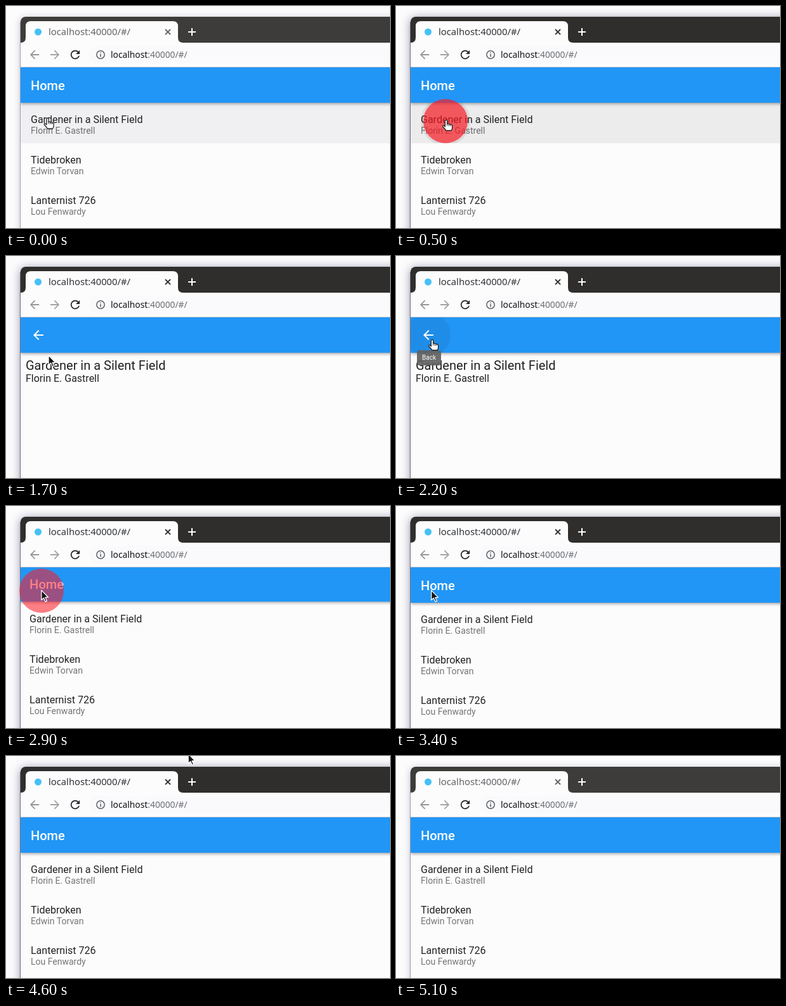
An HTML page with a canvas for the animation above (5.2 s loop, 605 by 351 pixels).

```html
<!DOCTYPE html>
<html lang="en">
<head>
<meta charset="utf-8">
<title>Book list navigation</title>
<style>
html, body { margin: 0; width: 100%; height: 100%; overflow: hidden; background: #fcfcfd; }
canvas { display: block; }
</style>
</head>
<body>
<canvas id="stage" width="605" height="351"></canvas>
<script>
const ctx = document.getElementById('stage').getContext('2d');
const W = 605, H = 351, LOOP = 5200, STEP = 100;
const PAPER = '#fcfcfd', BLUE = '#2196f6';
const INK = 'rgba(0,0,0,.87)', MUTED = 'rgba(0,0,0,.54)';
const UI = '"Noto Sans", "Open Sans", sans-serif', APP = 'Roboto, sans-serif';
const VIEW = { x: 23, y: 97, w: 794, h: 766, cx: 420, cy: 480 };

const BOOKS = [
  ['Gardener in a Silent Field', 'Florin E. Gastrell'],
  ['Tidebroken', 'Edwin Torvan'],
  ['Lanternist 726', 'Lou Fenwardy']
];

const PUSH = 550, POP = 2740, ROUTE_MS = 300;
const CLICKS = [{ at: 400, x: 78, y: 182 }, { at: 2650, x: 56, y: 134 }];
const MOUSE = [[0, 64.5, 177], [350, 78, 180], [1400, 78, 180], [2000, 56, 132],
               [4300, 55.5, 132.5], [4700, 330, -30], [LOOP, 330, -30]];

const ICON = {
  arrow: new Path2D('M20 11H7.83l5.59-5.59L12 4l-8 8 8 8 1.41-1.41L7.83 13H20z'),
  reload: new Path2D('M17.65 6.35C16.2 4.9 14.21 4 12 4c-4.42 0-7.99 3.58-7.99 8s3.57 8 7.99 8c3.73 0 6.84-2.55 7.73-6h-2.08c-.82 2.33-3.04 4-5.65 4-3.31 0-6-2.69-6-6s2.69-6 6-6c1.66 0 3.14.69 4.22 1.78L13 11h7V4z'),
  pointer: new Path2D('M0 1V16.5L3.6 13.2 6.2 19 8.6 18 6.2 12.3H10.8z'),
  hand: new Path2D('M-.6 1.2Q1 -1 2.6 1.2V6.5Q4.2 5 5.4 7Q7 5.8 8 7.6Q10.6 6.8 10.6 9.5V12.5Q10.6 15 9 17H1Q-1 14 -4 11Q-5 8.5 -2.6 9L-.6 10.8Z')
};

const clamp = v => Math.max(0, Math.min(1, v));
const lerp = (a, b, p) => a + (b - a) * p;
const ramp = (v, from, to) => clamp((v - from) / (to - from));
const smooth = p => p * p * (3 - 2 * p);

function bezier(x1, y1, x2, y2, x) {
  const at = (a, b, s) => 3 * (1 - s) ** 2 * s * a + 3 * (1 - s) * s * s * b + s ** 3;
  let lo = 0, hi = 1;
  for (let i = 0; i < 20; i++) {
    const mid = (lo + hi) / 2;
    if (at(x1, x2, mid) < x) lo = mid; else hi = mid;
  }
  return at(y1, y2, lo);
}

// Fast start, very slow settle
function routeEase(p) {
  const cut = 1 / 6;
  return p < cut
    ? 0.4 * bezier(0.05, 0, 0.1333, 0.06, p / cut)
    : 0.4 + 0.6 * bezier(0.2083, 0.82, 0.25, 1, (p - cut) / (1 - cut));
}

function mouseAt(t) {
  const i = MOUSE.findIndex(m => m[0] > t);
  const a = MOUSE[i - 1], b = MOUSE[i];
  const p = smooth(ramp(t, a[0], b[0]));
  return { x: lerp(a[1], b[1], p), y: lerp(a[2], b[2], p) };
}

function rect(x, y, w, h, color, radius = 0) {
  ctx.fillStyle = color;
  ctx.beginPath();
  ctx.roundRect(x, y, w, h, radius);
  ctx.fill();
}

function disc(x, y, r, color) {
  ctx.fillStyle = color;
  ctx.beginPath();
  ctx.arc(x, y, r, 0, Math.PI * 2);
  ctx.fill();
}

function text(str, x, y, font, color) {
  ctx.font = font;
  ctx.fillStyle = color;
  ctx.fillText(str, x, y);
  return ctx.measureText(str).width;
}

function lines(color, width, ...segments) {
  ctx.strokeStyle = color;
  ctx.lineWidth = width;
  ctx.beginPath();
  for (const [x1, y1, x2, y2] of segments) {
    ctx.moveTo(x1, y1);
    ctx.lineTo(x2, y2);
  }
  ctx.stroke();
}

// 24-unit icon centred on a point
function icon(path, x, y, size, color, flip = 1) {
  ctx.save();
  ctx.translate(x, y);
  ctx.scale(flip * size / 24, size / 24);
  ctx.translate(-12, -12);
  ctx.fillStyle = color;
  ctx.fill(path);
  ctx.restore();
}

function drawBrowser(active) {
  rect(0, 0, W, H, PAPER);
  ctx.save();
  ctx.shadowColor = active ? 'rgba(50,50,95,.55)' : 'rgba(50,50,90,.32)';
  ctx.shadowBlur = active ? 15 : 12;
  ctx.shadowOffsetY = 2;
  rect(23, 17, 800, 600, active ? '#302e2c' : '#3e3c3a', 8);
  ctx.restore();
  lines(active ? 'rgba(40,40,60,.55)' : 'rgba(40,40,60,.35)', 1, [22.5, 25, 22.5, H]);

  rect(23, 58, W, H, PAPER);
  ctx.fillStyle = PAPER;
  ctx.beginPath();
  ctx.moveTo(23, 58);
  ctx.quadraticCurveTo(31, 58, 31, 50);
  ctx.lineTo(31, 32);
  ctx.quadraticCurveTo(31, 24, 39, 24);
  ctx.lineTo(263, 24);
  ctx.quadraticCurveTo(271, 24, 271, 32);
  ctx.lineTo(271, 50);
  ctx.quadraticCurveTo(271, 58, 279, 58);
  ctx.fill();

  const tabInk = active ? '#303236' : '#626366';
  disc(50.5, 41, 5.5, '#45c1f6');
  text('localhost:40000/#/', 67, 46, '14.75px ' + UI, tabInk);
  lines(tabInk, 1.8, [251, 37, 259, 45], [259, 37, 251, 45]);
  lines('#fff', 2, [287, 41, 299, 41], [293, 35, 293, 47]);

  icon(ICON.arrow, 45, 77, 21.5, '#97979b');
  icon(ICON.arrow, 77, 77, 21.5, '#a4a4a8', -1);
  icon(ICON.reload, 109, 77, 21.5, '#2c2d30');
  rect(131, 63, W, 28, '#fafafd', 14);
  ctx.strokeStyle = '#5f6368';
  ctx.lineWidth = 1.5;
  ctx.beginPath();
  ctx.arc(149, 77, 6.2, 0, Math.PI * 2);
  ctx.stroke();
  lines('#5f6368', 1.6, [149, 76, 149, 80.5], [149, 73.2, 149, 74.8]);
  const hostWidth = text('localhost', 165, 82, '13.8px ' + UI, '#101113');
  text(':40000/#/', 165 + hostWidth, 82, '13.8px ' + UI, '#6a6d72');
  rect(23, 96, W, 1, '#c9ccd4');
}

function drawAppBar() {
  ctx.save();
  ctx.shadowColor = 'rgba(0,0,0,.4)';
  ctx.shadowBlur = 5;
  ctx.shadowOffsetY = 1.5;
  rect(VIEW.x, VIEW.y, VIEW.w, 56, BLUE);
  ctx.restore();
}

function drawHome(t) {
  rect(VIEW.x, VIEW.y, VIEW.w, VIEW.h, PAPER);
  if (t < PUSH + ROUTE_MS) {
    const click = CLICKS[0], age = t - click.at;
    rect(VIEW.x, 153, VIEW.w, 64, age < 0 ? '#f0f0f3' : '#ececed');
    if (age >= 0) {
      ctx.save();
      ctx.beginPath();
      ctx.rect(VIEW.x, 147, VIEW.w, 70);
      ctx.clip();
      disc(click.x, click.y, 34 + age * 0.05, 'rgba(0,0,0,.07)');
      ctx.restore();
    }
  }
  drawAppBar();
  text('Home', 39, 133, '500 20px ' + APP, '#fff');
  BOOKS.forEach(([title, author], i) => {
    text(title, 39, 185 + 64 * i, '16px ' + APP, INK);
    text(author, 39, 202 + 64 * i, '14px ' + APP, MUTED);
  });
}

function drawDetails(hover) {
  rect(VIEW.x, VIEW.y, VIEW.w, VIEW.h, PAPER);
  drawAppBar();
  if (hover) {
    ctx.save();
    ctx.beginPath();
    ctx.rect(VIEW.x, VIEW.y, VIEW.w, 56);
    ctx.clip();
    disc(51, 125, 35, 'rgba(0,0,0,.06)');
    ctx.restore();
  }
  icon(ICON.arrow, 51, 125, 24, '#fff');
  text(BOOKS[0][0], 31, 180, '20px ' + APP, INK);
  text(BOOKS[0][1], 31, 199, '16px ' + APP, INK);
}

function layer(scale, alpha, draw) {
  if (alpha <= 0) return;
  ctx.save();
  ctx.globalAlpha = alpha;
  ctx.translate(VIEW.cx, VIEW.cy);
  ctx.scale(scale, scale);
  ctx.translate(-VIEW.cx, -VIEW.cy);
  draw();
  ctx.restore();
}

function drawRoutes(t, hover) {
  const push = ramp(t, PUSH, PUSH + ROUTE_MS), pop = ramp(t, POP, POP + ROUTE_MS);
  const fadeIn = p => ramp(p, 0.125, 0.25), fadeOut = p => 1 - ramp(p, 0.0825, 0.2075);
  const home = () => drawHome(t), details = () => drawDetails(hover);
  ctx.save();
  ctx.beginPath();
  ctx.rect(VIEW.x, VIEW.y, W, H);
  ctx.clip();
  if (pop > 0) {
    const e = routeEase(pop);
    layer(lerp(1.1, 1, e), fadeIn(pop), home);
    layer(lerp(1, 0.9, e), fadeOut(pop), details);
  } else {
    const e = routeEase(push);
    layer(lerp(1, 1.05, e), fadeOut(push), home);
    if (push > 0 && push < 1) {
      rect(VIEW.x, VIEW.y, W, H, `rgba(0,0,0,${0.6 * ramp(push, 0.2075, 0.4175)})`);
    }
    layer(lerp(0.85, 1, e), fadeIn(push), details);
  }
  ctx.restore();
}

function drawTooltip(alpha) {
  if (alpha <= 0) return;
  ctx.save();
  ctx.globalAlpha = alpha;
  rect(33, 149, 38, 24, 'rgba(97,97,97,.92)', 4);
  text('Back', 41, 164, '10px ' + APP, '#fff');
  ctx.restore();
}

function drawCursor({ x, y }, hand) {
  ctx.save();
  ctx.translate(x, y);
  ctx.lineJoin = 'round';
  ctx.lineWidth = 1.3;
  ctx.strokeStyle = hand ? '#222' : '#fff';
  ctx.fillStyle = hand ? '#fff' : '#151515';
  const shape = hand ? ICON.hand : ICON.pointer;
  ctx.fill(shape);
  ctx.stroke(shape);
  if (hand) lines('#222', 1, [2.6, 6.5, 2.6, 9.5], [5.4, 7, 5.4, 10], [8, 7.6, 8, 10]);
  ctx.restore();
}

function render(t) {
  const mouse = mouseAt(t);
  const onBack = t > PUSH + ROUTE_MS && t < POP && Math.hypot(mouse.x - 51, mouse.y - 125) < 28;
  drawBrowser(t >= CLICKS[0].at && t < 4800);
  drawRoutes(t, onBack);
  drawTooltip(t < CLICKS[1].at ? ramp(t, 1950, 2150) : 0);
  for (const { at, x, y } of CLICKS) {
    const fade = 1 - ramp(t, at, at + 900);
    if (t >= at && t < at + 700) disc(x, y, 35, `rgba(255,25,35,${0.76 * fade})`);
  }
  drawCursor(mouse, onBack || t <= PUSH);
}

const start = performance.now();
function tick() {
  const t = (performance.now() - start) % LOOP;
  render(Math.floor(t / STEP) * STEP);
  requestAnimationFrame(tick);
}
tick();
</script>
</body>
</html>
```
